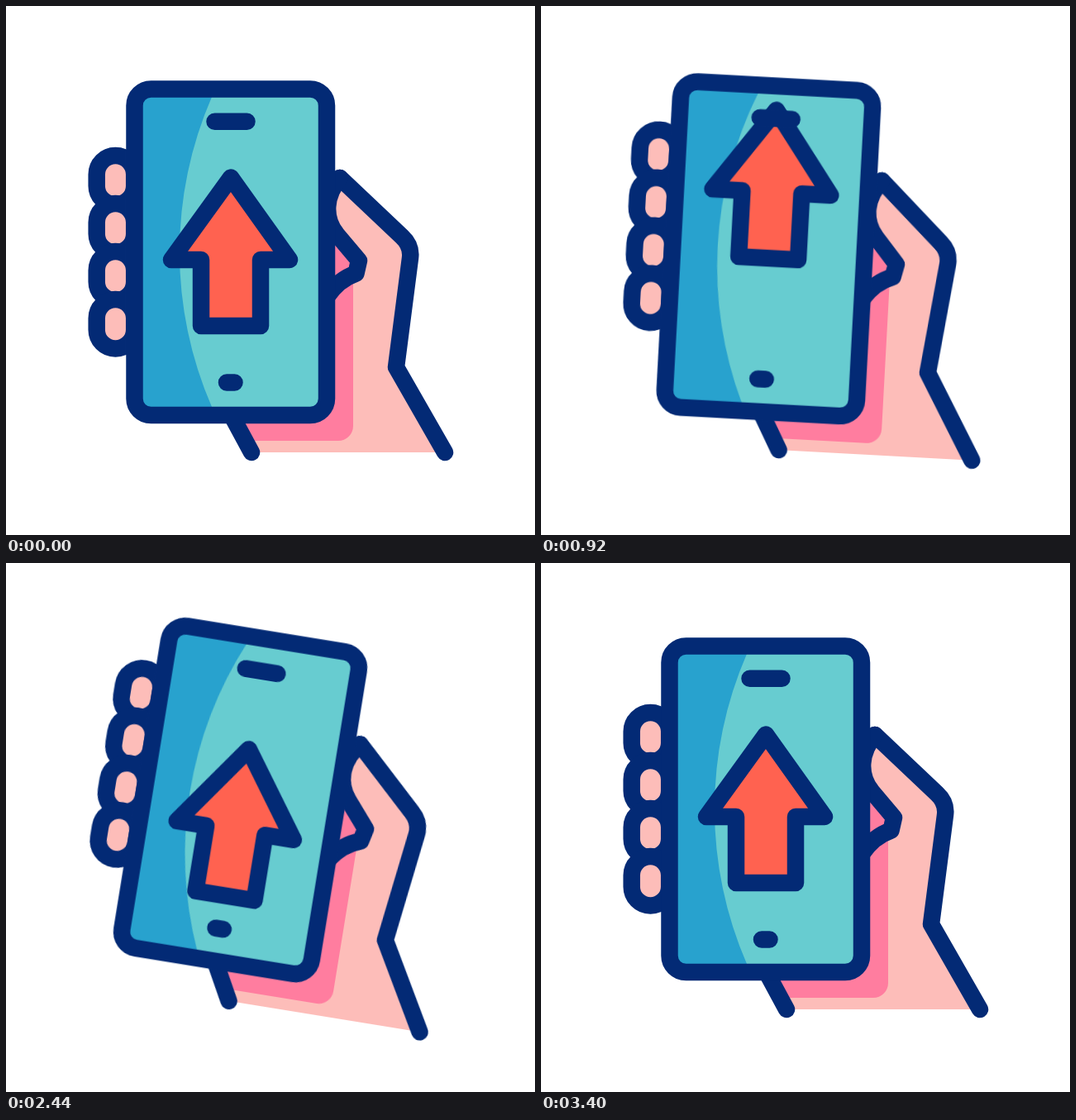
These frames come from a looping animation (640 by 640 pixels, 3600 ms). An HTML page without scripts:

```html
<!DOCTYPE html>
<html lang="en">
<head>
<meta charset="utf-8">
<title>Phone in hand</title>
<style>
  html, body { margin: 0; width: 100%; height: 100%; overflow: hidden; background: #fff; }
  svg { display: block; width: 100vw; height: 100vh; }

  .line { fill: none; stroke: #032a75; stroke-width: 20.5; stroke-linecap: round; stroke-linejoin: round; }
  .skin { fill: #fdbdb9; }
  .arrow { fill: #ff6250; }
  .rays { stroke: #fff; }

  .arm, .fingers, .arrow, .check, .rays, .slots {
    animation: 3.6s cubic-bezier(.33, 0, .67, 1) infinite;
  }
  .arm { transform-origin: 346px 365px; animation-name: swing; }
  .fingers { animation-name: slide; }
  .arrow { animation-name: launch; }
  .check { animation-name: tick; }
  .rays { animation-name: burst; }
  .slots { animation-name: flash; }

  @keyframes swing {
    0%, 92.5%, 100% { transform: rotate(0deg); }
    11.67%, 17.5% { transform: rotate(-16deg); }
    29.7%, 66.7% { transform: rotate(10deg); }
    76.1% { transform: rotate(-10deg); }
    84.2% { transform: rotate(5.5deg); }
  }
  @keyframes slide {
    0%, 92.5%, 100% { transform: translateY(0); }
    11.67%, 17.5% { transform: translateY(35.5px); }
    29.7%, 61.7% { transform: translateY(-40px); }
    75.5%, 78% { transform: translateY(4.4px); }
  }
  @keyframes launch {
    0%, 94.4%, 100% { transform: translateY(0); }
    11.67% { transform: translateY(28px); }
    18% { transform: translateY(28px); animation-timing-function: cubic-bezier(.6, 0, .7, 1); }
    33% { transform: translateY(-300px); }
    33.01% { transform: translateY(300px); }
    60.6% { transform: translateY(300px); animation-timing-function: cubic-bezier(.25, .3, .4, 1); }
    67% { transform: translateY(28px); }
    83% { transform: translateY(28px); animation-timing-function: cubic-bezier(.33, 0, .2, 1); }
  }
  @keyframes tick {
    0%, 32.7% { opacity: 0; stroke-dasharray: 0 400; stroke-dashoffset: 0; }
    32.71% {
      opacity: 1; stroke-dasharray: 0 400; stroke-dashoffset: 0;
      animation-timing-function: cubic-bezier(.1, .6, .4, 1);
    }
    39.4%, 57% { opacity: 1; stroke-dasharray: 73.2 400; stroke-dashoffset: -90.8; }
    61.6% { opacity: 1; stroke-dasharray: 0 400; stroke-dashoffset: -164; }
    61.61%, 100% { opacity: 0; stroke-dasharray: 0 400; stroke-dashoffset: -164; }
  }
  @keyframes burst {
    0%, 38.3% { opacity: 0; stroke-dasharray: 0 200; stroke-dashoffset: 0; }
    38.31% {
      opacity: 1; stroke-dasharray: 0 200; stroke-dashoffset: 0;
      animation-timing-function: cubic-bezier(.2, .5, .4, 1);
    }
    53.5% { opacity: 1; stroke-dasharray: 24.5 200; stroke-dashoffset: -32; }
    60% { opacity: 1; stroke-dasharray: 0 200; stroke-dashoffset: -57; }
    60.01%, 100% { opacity: 0; stroke-dasharray: 0 200; stroke-dashoffset: -57; }
  }
  @keyframes flash {
    0%, 69%, 89%, 100% { stroke: #032a75; stroke-width: 20.5; }
    75%, 80.5% { stroke: #fff; stroke-width: 23.5; }
  }
</style>
</head>
<body>
<svg viewBox="0 0 640 640">
  <defs>
    <clipPath id="screen"><rect x="155" y="100" width="233" height="395" rx="20"/></clipPath>
    <rect id="finger" x="109.7" y="181" width="45.5" height="59.5" rx="22.7"/>
    <path id="ray" d="M272 264.5V184.5"/>
    <g id="cross">
      <use href="#ray"/>
      <use href="#ray" transform="rotate(90 272 294.5)"/>
      <use href="#ray" transform="rotate(180 272 294.5)"/>
      <use href="#ray" transform="rotate(270 272 294.5)"/>
    </g>
  </defs>

  <g class="arm">
    <!-- palm and thumb -->
    <path class="skin" d="M404 208L479 279Q491 290 489 305L472 437L531 540H297L270 490H388V245Z"/>
    <path fill="#ff7d9f" d="M388 262L427 308L423.5 323.5L420 325V508A18 18 0 0 1 402 526H289L270 490H388Z"/>
    <g class="line">
      <path d="M404 208L479 279Q491 290 489 305L472 437L531 540"/>
      <path d="M404 208C386 229 384 256 400 276L427 308L423.5 323.5Q402 331 388 352"/>
      <path d="M270 490L297 540"/>
    </g>

    <g class="fingers">
      <g class="line skin">
        <use href="#finger"/>
        <use href="#finger" y="58"/>
        <use href="#finger" y="116"/>
        <use href="#finger" y="174"/>
      </g>
    </g>

    <!-- phone -->
    <g clip-path="url(#screen)">
      <path fill="#67ccd0" d="M155 100H388V495H155Z"/>
      <path fill="#28a2ce" d="M155 100H253.5L249 110A470 470 0 0 0 249 485L253.5 495H155Z"/>
      <path class="line arrow" d="M272 207.5L343 307H308V387H236V307H200Z"/>
      <path class="line check" d="M186.3 238.8L262 314.5L350 226.5"/>
      <g class="line rays">
        <use href="#cross"/>
        <use href="#cross" transform="rotate(45 272 294.5)"/>
      </g>
    </g>
    <path class="line slots" d="M252.5 139.7H291.5M267 455.5H276.5"/>
    <rect class="line" x="155.5" y="100.5" width="232.5" height="394.5" rx="20"/>
  </g>
</svg>
</body>
</html>
```
